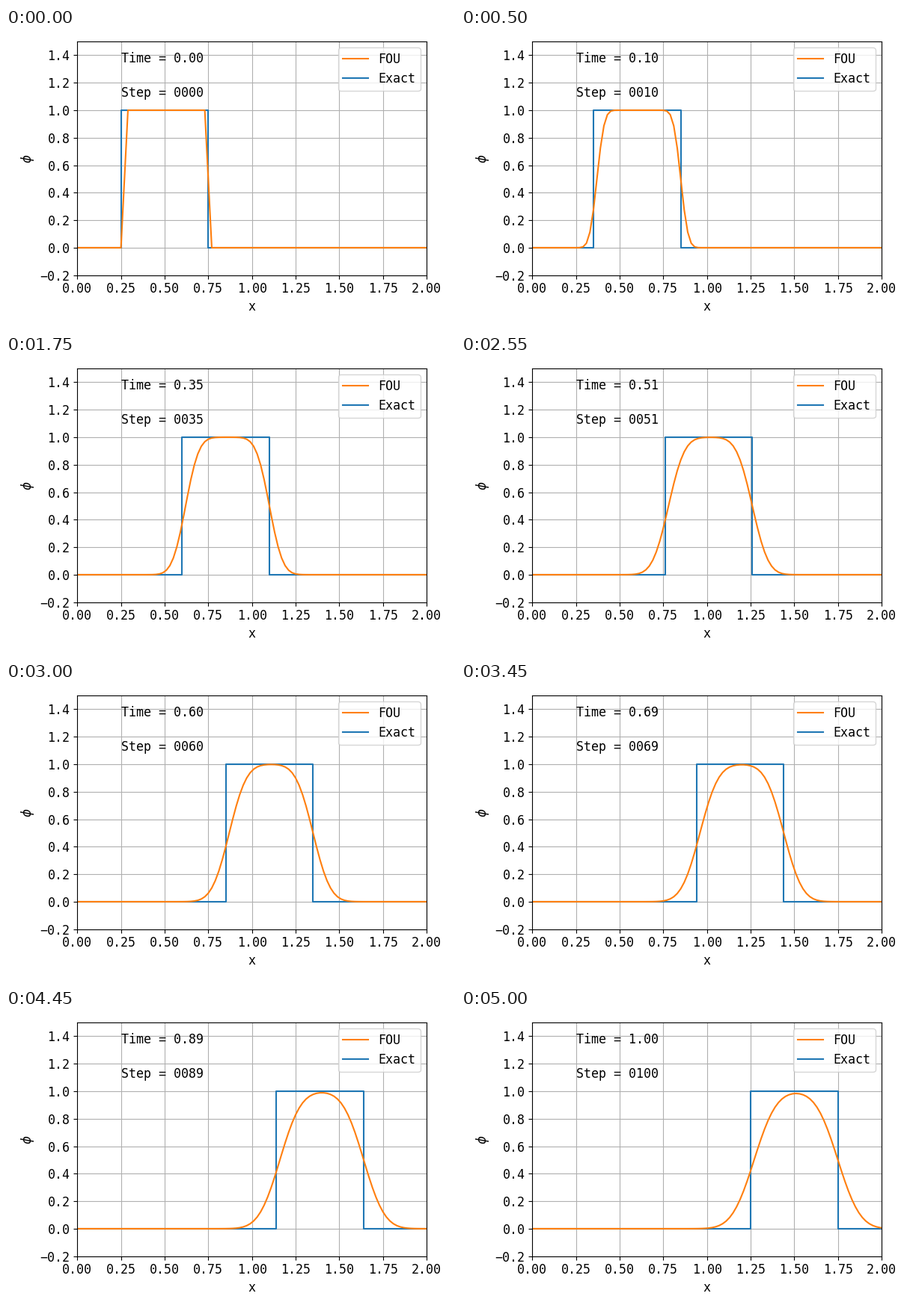
These frames come from a looping animation (600 px wide and 400 px high, 5050 ms). A matplotlib script:

```python
import numpy as np
import matplotlib.pyplot as plt
from matplotlib.animation import FuncAnimation

plt.rcParams["font.family"] = "DejaVu Sans Mono"
plt.rcParams["font.size"] = 12

LENGTH, CELLS = 2.0, 100
SPEED, DT, STEPS = 1.0, 0.01, 100
LEFT, RIGHT = 0.25, 0.75

dx = LENGTH / CELLS
courant = SPEED * DT / dx
# cell centres, with one ghost cell at each end
x = (np.arange(CELLS + 2) - 0.5) * dx


def solve():
    """First-order upwind profiles, one row per step."""
    phi = np.where((x > LEFT + 1e-9) & (x < RIGHT - 1e-9), 1.0, 0.0)
    rows = []
    for _ in range(STEPS + 1):
        phi[1:] -= courant * (phi[1:] - phi[:-1])
        rows.append(phi.copy())
    return rows


def pulse(t):
    a, b = LEFT + SPEED * t, RIGHT + SPEED * t
    return [0, a, a, b, b, LENGTH], [0, 0, 1, 1, 0, 0]


profiles = solve()

fig, ax = plt.subplots(figsize=(6, 4), dpi=100)
exact, = ax.plot(*pulse(0), color="C0", label="Exact")
upwind, = ax.plot(x, profiles[0], color="C1", label="FOU")
time_text = ax.text(0.25, 1.35, "Time = 0.00")
step_text = ax.text(0.25, 1.10, "Step = 0000")

ax.set_xlim(0, LENGTH)
ax.set_ylim(-0.2, 1.5)
ax.set_xlabel("x")
ax.set_ylabel(r"$\phi$")
ax.grid(True)
ax.legend(handles=[upwind, exact], loc="upper right")
fig.tight_layout()


def update(n):
    t = n * DT
    exact.set_data(*pulse(t))
    upwind.set_ydata(profiles[n])
    time_text.set_text(f"Time = {t:.2f}")
    step_text.set_text(f"Step = {n:04d}")
    return exact, upwind, time_text, step_text


anim = FuncAnimation(fig, update, frames=STEPS + 1, interval=50,
                     repeat=True, repeat_delay=0)
plt.show()
```
